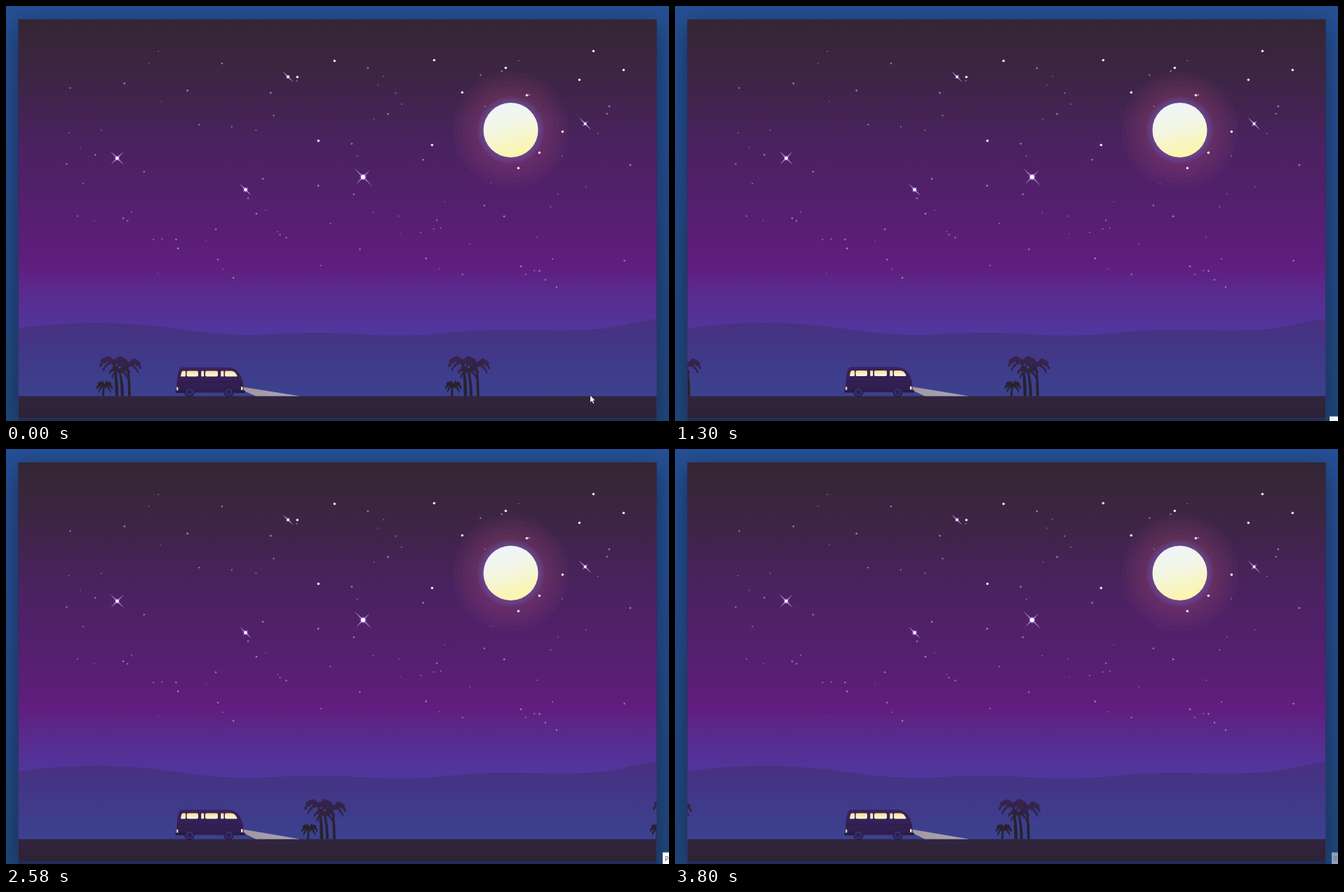
Write an HTML page with a canvas that moves like this. It is 945 px wide and 592 px high and loops after 3820 ms.

```html
<!DOCTYPE html>
<html lang="en">
<head>
<meta charset="utf-8">
<title>Night drive</title>
<style>
html, body { margin: 0; width: 100%; height: 100%; overflow: hidden; background: #1f4685; }
canvas { display: block; width: 945px; height: 592px; }
</style>
</head>
<body>
<canvas id="stage" width="945" height="592"></canvas>
<script>
const W = 945, H = 592, LOOP = 3820, STEP = 20;
const PALM_GAP = 497, PALM_START = 129, HORIZON = 556.5;
const BOX = { x: 17.7, y: 19, w: 909.6, h: 569.5 };
const ctx = document.getElementById('stage').getContext('2d');

// The drive slows slightly: [time in ms, road travelled in px]
const ROAD = [[0, 0], [600, 559], [1300, 1150], [1820, 1589], [2580, 2193], [3060, 2586], [3800, 3151]];

function randomizer(seed) {
  return () => (seed = seed * 16807 % 2147483647) / 2147483647;
}

function gradient(g, y0, y1, ...stops) {
  return colorStops(g.createLinearGradient(0, y0, 0, y1), stops);
}

function colorStops(fill, stops) {
  stops.forEach(([at, color]) => fill.addColorStop(at, color));
  return fill;
}

function disc(g, x, y, r, fill) {
  g.fillStyle = fill;
  g.beginPath();
  g.arc(x, y, r, 0, Math.PI * 2);
  g.fill();
}

function shape(g, path, fill) {
  g.fillStyle = fill;
  g.fill(new Path2D(path));
}

function bar(g, x, y, w, h, r, fill) {
  g.fillStyle = fill;
  g.beginPath();
  g.roundRect(x, y, w, h, r);
  g.fill();
}

function layer(width, height, draw) {
  const canvas = document.createElement('canvas');
  canvas.width = width;
  canvas.height = height;
  draw(canvas.getContext('2d'));
  return canvas;
}

function drawStars(g) {
  const random = randomizer(4217);
  for (let i = 0; i < 95; i++) {
    const x = 75 + 815 * random(), y = 62 + 342 * random(), glow = random();
    disc(g, x, y, .8 + .6 * glow, `rgba(200,168,215,${.4 + .3 * glow})`);
  }
  const bright = [[468, 78], [415, 101], [610, 77], [712, 88], [837, 64], [880, 91], [817, 105],
    [650, 123], [742, 127], [607, 198], [445, 192], [793, 179], [760, 209], [730, 231]];
  for (const [x, y] of bright) disc(g, x + .3, y + .3, 1.75, '#efe6f3');
}

// Two crossing diagonal rays around a bright core
function drawSparkle(g, x, y, long, short, core) {
  g.save();
  g.translate(x, y);
  g.rotate(Math.PI / 4);
  disc(g, 0, 0, core * 1.7, 'rgba(140,80,220,.3)');
  const ray = (a, b) => shape(g, `M${-a} 0L0 ${-b}L${a} 0L0 ${b}Z`, '#b48dd4');
  ray(long, 1);
  ray(1, short);
  disc(g, 0, 0, core, '#fbf5ff');
  g.restore();
}

function drawMoon(g) {
  const x = 719.5, y = 177;
  for (let r = 83; r > 50; r -= 7) disc(g, x, y, r, 'rgba(150,75,115,.07)');
  for (let r = 48; r > 39; r -= 3) disc(g, x, y, r, 'rgba(115,105,195,.15)');
  disc(g, x, y, 39, colorStops(g.createLinearGradient(x - 10, y - 38, x + 10, y + 38),
    [[0, '#eef5fb'], [.4, '#f3f6e6'], [1, '#fbf5a8']]));
}

const scenery = layer(W, H, g => {
  g.fillStyle = gradient(g, 0, H, [0, '#244f94'], [.5, '#234b8c'], [1, '#1f477d']);
  g.fillRect(0, 0, W, H);
  g.save();
  g.shadowColor = 'rgba(15,30,55,.7)';
  g.shadowBlur = 34;
  g.shadowOffsetY = 10;
  g.fillStyle = '#2c2335';
  g.fillRect(BOX.x, BOX.y, BOX.w, BOX.h);
  g.restore();

  g.save();
  g.beginPath();
  g.rect(BOX.x, BOX.y, BOX.w, BOX.h);
  g.clip();
  g.fillStyle = gradient(g, 19, 470, [0, '#342633'], [.18, '#3d2544'], [.4, '#4a2260'],
    [.62, '#561f70'], [.78, '#601e7e'], [.86, '#5a2a8d'], [1, '#4e389f']);
  g.fillRect(0, 0, W, H);
  drawMoon(g);
  drawStars(g);
  drawSparkle(g, 402, 101, 11, 4, 1.8);
  drawSparkle(g, 158.5, 217, 14, 13, 2.4);
  drawSparkle(g, 341.5, 262, 12, 5, 2.3);
  drawSparkle(g, 509, 244, 18, 14, 3.2);
  drawSparkle(g, 825.5, 168, 13, 6, 1.8);
  shape(g, 'M17 460C60 453 100 452 135 452C230 453 265 469 345 469C385 469 400 466 440 466' +
    'C490 466 515 470 560 470C620 470 640 462 710 462C760 462 785 463 825 462' +
    'C870 461 893 450 928 446V592H17Z',
    gradient(g, 447, 557, [0, '#493080'], [.2, '#463383'], [.55, '#403a89'], [1, '#3b428f']));
  g.fillStyle = gradient(g, 556, 588, [0, '#30253d'], [1, '#2d2335']);
  g.fillRect(0, HORIZON, W, 40);
  g.restore();
  g.fillStyle = '#1f2c5c';
  g.fillRect(BOX.x, 588.5, BOX.w, 3.5);
});

// An arched leaf with a smooth back and a ragged underside
function drawFrond(g, x, y, tipX, tipY) {
  const dx = tipX - x, dy = tipY - y, teeth = 8;
  const point = (t, drop) => [x + dx * t, y + dy * t - Math.abs(dx) * 1.1 * t * (1 - t) + drop];
  g.beginPath();
  g.moveTo(x, y);
  for (let i = 1; i <= teeth; i++) g.lineTo(...point(i / teeth, -1.3));
  for (let i = teeth; i >= 0; i--) g.lineTo(...point(i / teeth, i % 2 ? 4.2 : 1.8));
  g.fill();
}

// A fan of leaves, from drooping left over the top to drooping right
function drawCrown(g, x, y, rx, ry, count) {
  for (let i = 0; i < count; i++) {
    const angle = Math.PI * (.78 + 1.44 * i / (count - 1));
    drawFrond(g, x, y, x + rx * Math.cos(angle), y + ry * (Math.sin(angle) + .3));
  }
  disc(g, x, y, rx * .2, g.fillStyle);
}

function drawTrunk(g, base, topX, top, width) {
  const half = width / 2;
  g.beginPath();
  g.moveTo(base - half, 59);
  g.quadraticCurveTo(base - half, (59 + top) / 2, topX - half * .7, top);
  g.lineTo(topX + half * .7, top);
  g.quadraticCurveTo(base + half, (59 + top) / 2, base + half, 59);
  g.fill();
}

const palms = layer(72, 64, g => {
  g.translate(2, 4);
  g.fillStyle = gradient(g, 0, 40, [0, '#3a2352'], [.45, '#302340'], [1, '#27222c']);
  drawTrunk(g, 29, 25, 10, 4.5);
  drawTrunk(g, 37, 33, 22, 4);
  drawTrunk(g, 47, 44, 13, 3.8);
  drawTrunk(g, 9.5, 11, 43, 3);
  drawCrown(g, 25, 10, 21, 12, 9);
  drawCrown(g, 46, 13, 18, 12, 9);
  drawCrown(g, 33, 22, 15, 10, 7);
  drawCrown(g, 11.5, 43, 11.5, 9, 8);
});

function drawWheel(x, y) {
  disc(ctx, x, y, 7.2, '#2b1d4b');
  disc(ctx, x, y, 5, '#433a80');
  disc(ctx, x, y, 3.7, '#2d2054');
}

function drawBus(lift) {
  ctx.save();
  ctx.translate(0, lift);
  const light = colorStops(ctx.createLinearGradient(337, 0, 419, 0), [[0, '#a1989f'], [1, '#aea4b8']]);
  shape(ctx, `M337 544L419 ${HORIZON - lift}H356L338 549Z`, light);
  shape(ctx, 'M250 516H316C329 516 336 526 338 539L339 552H243L243.500 537C244 527 246 516 250 516Z',
    gradient(ctx, 516, 553, [0, '#3a225e'], [.5, '#352055'], [1, '#2e1d4b']));
  ctx.fillStyle = '#2d1c4a';
  ctx.fillRect(243.5, 536.5, 94, 1);
  bar(ctx, 241.5, 549, 14, 3.5, 1, '#281a40');
  bar(ctx, 325, 549, 16, 3.5, 1, '#281a40');

  const glass = gradient(ctx, 520.5, 529, [0, '#fbd98c'], [.45, '#fdeab5'], [1, '#fff9e2']);
  shape(ctx, 'M252 521H255Q256 521 256 522V528Q256 529 255 529H249.500Q249 529 249.200 528Q250 521 252 521Z', glass);
  bar(ctx, 257.5, 521, 16.5, 8, 2, glass);
  bar(ctx, 278.2, 521, 4, 8, 1.3, glass);
  bar(ctx, 284, 521, 18, 8, 2, glass);
  bar(ctx, 306.2, 521, 4.2, 8, 1.3, glass);
  shape(ctx, 'M313.500 521H321Q326 521 329 527Q330 529 328 529H313.500Q312 529 312 527V522.500Q312 521 313.500 521Z', glass);
  bar(ctx, 243.3, 544, 2, 5, 1, '#f6e2bd');
  bar(ctx, 335, 543.5, 2.4, 5, 1, '#fff3d2');
  ctx.restore();
  drawWheel(261.5, 550.7);
  drawWheel(317.5, 550.7);
}

function drawCursor(time) {
  if (time > 480) return;
  const p = Math.max(0, time - 60) / 420;
  ctx.save();
  ctx.translate(832 + 100 * p * p, 555 + 38 * p * p);
  ctx.lineWidth = .7;
  ctx.strokeStyle = '#111';
  const arrow = 'M.5 0V11L3 8.700L4.800 12.500L6.700 11.700L5 8H8.300Z';
  shape(ctx, arrow, '#fff');
  ctx.stroke(new Path2D(arrow));
  ctx.restore();
}

function drawTooltip(time) {
  if (time >= 1200 && time < 1500) {
    ctx.fillStyle = '#f7f7f9';
    ctx.fillRect(933, 585.5, 12, 7);
  }
  if (time < 2000) return;
  ctx.save();
  ctx.globalAlpha = Math.min(1, Math.max(0, 1 - (time - 3740) / 120));
  ctx.fillStyle = '#fbfbfd';
  ctx.fillRect(936, 575.5, 9, 17);
  ctx.fillStyle = '#4a4a55';
  ctx.font = '9px "Open Sans", sans-serif';
  ctx.fillText('Pa', 939, 588);
  ctx.restore();
}

function travelAt(time) {
  const next = Math.max(1, ROAD.findIndex(key => key[0] >= time));
  const [t0, x0] = ROAD[next - 1], [t1, x1] = ROAD[next];
  return x0 + (x1 - x0) * (time - t0) / (t1 - t0);
}

function render(now) {
  const time = Math.floor(now % LOOP / STEP) * STEP;
  ctx.drawImage(scenery, 0, 0);

  ctx.save();
  ctx.beginPath();
  ctx.rect(BOX.x, BOX.y, BOX.w, HORIZON - BOX.y);
  ctx.clip();
  const offset = ((PALM_START - travelAt(time)) % PALM_GAP + PALM_GAP) % PALM_GAP;
  for (let x = offset - PALM_GAP; x < W; x += PALM_GAP) ctx.drawImage(palms, Math.round(x) - 2, 494);
  ctx.restore();

  drawBus(-.9 + .5 * Math.cos(time / 305 * Math.PI * 2));
  drawCursor(time);
  drawTooltip(time);
}

const start = performance.now();
function tick() {
  render(performance.now() - start);
  requestAnimationFrame(tick);
}
tick();
</script>
</body>
</html>
```
